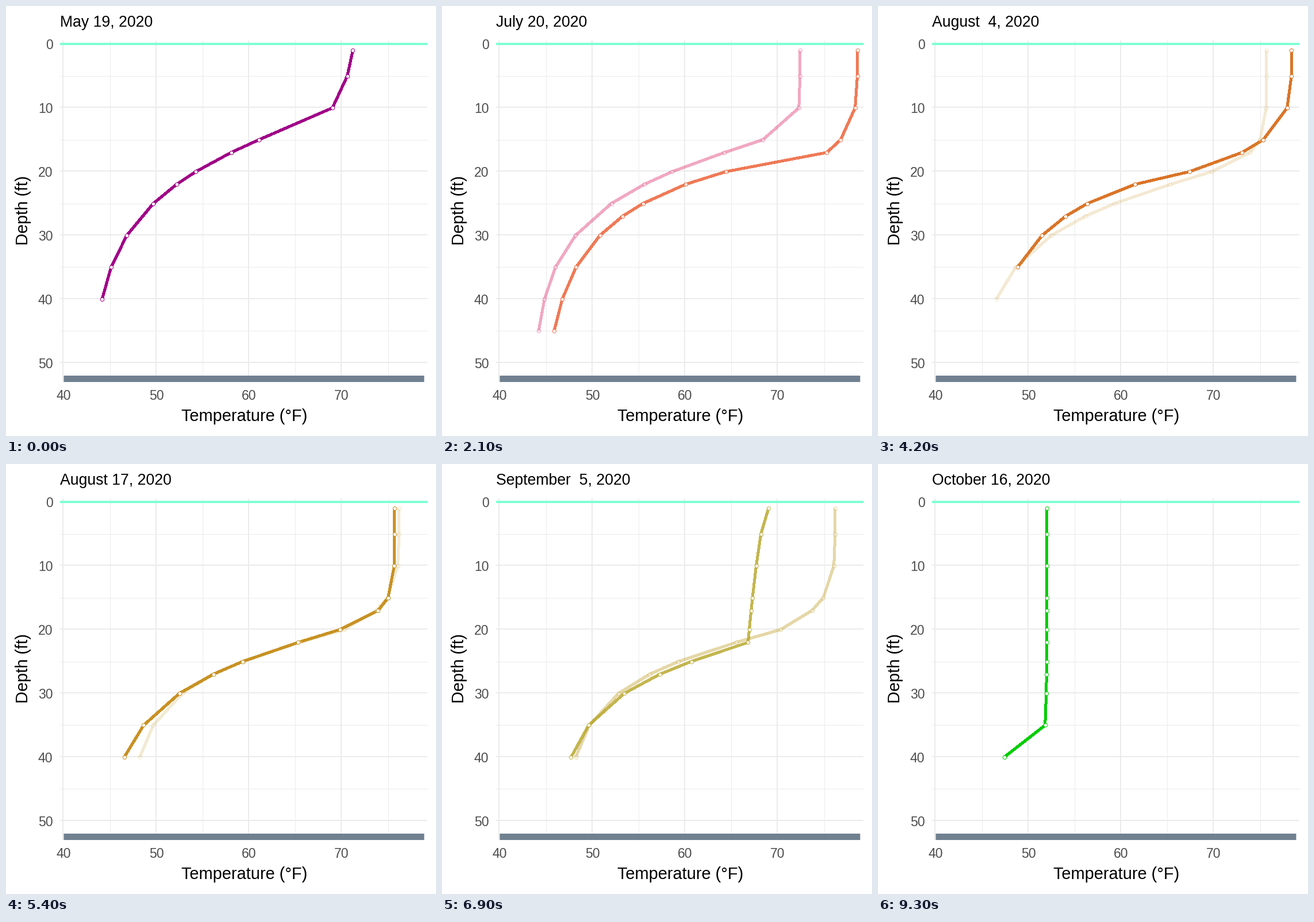
These frames come from a looping animation (748x748 px, 10000 ms). A matplotlib script:

```python
import numpy as np
import matplotlib.pyplot as plt
from matplotlib.animation import FuncAnimation
from matplotlib.colors import LinearSegmentedColormap
from matplotlib.patches import Rectangle

SIZE, DPI = 748, 64
PT = 72 / DPI  # points per pixel
FRAMES, INTERVAL = 100, 100
LEFT, RIGHT, TOP, BOTTOM = 94, 733, 59.5, 653.5

# Each date has a warm layer (surface temperature, bend) down to a knee
# (depth, temperature), a decay below it (floor, scale, shape), and an end depth.
PROFILES = [
    ("May 19, 2020", (71.2, 1.6), (10, 69.0), (43.0, 11.6, 1.2), 40),
    ("June 22, 2020", (72.4, 8), (15, 68.4), (43.5, 9.4, 1.1), 45),
    ("July 20, 2020", (78.6, 4.5), (17, 75.3), (44.5, 7.7, 0.88), 45),
    ("August  4, 2020", (78.4, 4.2), (20, 67.4), (45.0, 7.8, 0.87), 35),
    ("August 17, 2020", (75.7, 7), (20, 69.8), (44.3, 8.9, 1.1), 40),
    ("August 26, 2020", (76.2, 5), (20, 70.3), (47.1, 7.4, 1.12), 40),
    ("September  5, 2020", (69.0, 0.6), (22, 66.8), (46.0, 7.8, 1.1), 40),
    ("October  4, 2020", (56.5, 2), (30, 55.2), (46.0, 5.2, 0.8), 45),
    ("October 16, 2020", (52.0, 6), (35, 51.8), (46.0, 3.5, 1), 40),
]
LAST = len(PROFILES) - 1

PALETTE = LinearSegmentedColormap.from_list("season", [
    (0, "#A00087"), (1 / 8, "#DC2767"), (2 / 8, "#EC592D"),
    (4 / 8, "#C99125"), (6 / 8, "#B8A424"), (1, "#00CD00")])

# every hold and cross-fade takes 12 frames; the last two fades are shorter
FADES = [(6 + 12 * i, 5) for i in range(6)] + [(78, 4), (89, 4)]

plt.rcParams["font.family"] = "Liberation Sans"
fig = plt.figure(figsize=(SIZE / DPI, SIZE / DPI), dpi=DPI, facecolor="white")
ax = fig.add_axes([0, 0, 1, 1])
ax.set_xlim(-0.5, SIZE - 0.5)
ax.set_ylim(SIZE - 0.5, -0.5)
ax.axis("off")


def px(temp):
    return 100 + 16.117 * (temp - 40)


def py(depth):
    return 65.8 + 11.09 * depth


def sample_depths(end, with_27):
    depths = {1, 17, 22, *range(5, end + 1, 5)}
    if with_27:
        depths.add(27)
    return np.array(sorted(depths), dtype=float)


def temperature(depth, warm, knee, decay):
    (surface, bend), (knee_depth, knee_temp) = warm, knee
    floor, scale, shape = decay
    down = np.clip((depth - 1) / (knee_depth - 1), 0, 1)
    below = np.maximum(depth - knee_depth, 0) / scale
    upper = surface + (knee_temp - surface) * down ** bend
    lower = floor + (knee_temp - floor) * np.exp(-below ** shape)
    return np.where(depth <= knee_depth, upper, lower)


def stroke(xs, ys, color, width, z):
    line, = ax.plot(xs, ys, color=color, lw=width * PT, zorder=z,
                    antialiased=False, solid_capstyle="butt",
                    solid_joinstyle="round")
    return line


def label(x, y, text, size, color="black", **kw):
    return ax.text(x, y, text, fontsize=size * PT, color=color, zorder=9,
                   va="baseline", **kw)


def draw_panel():
    for temp in range(40, 80, 5):
        major = temp % 10 == 0
        x = px(temp) - major
        stroke([x, x], [TOP, BOTTOM], "#EBEBEB", 1 + major, 1)
        if major:
            label(px(temp), 685, str(temp), 23, "#4D4D4D", ha="center")
    for depth in range(0, 55, 5):
        major = depth % 10 == 0
        y = py(depth) - major
        stroke([LEFT, RIGHT], [y, y], "#EBEBEB", 1 + major, 1)
        if major:
            label(81, py(depth) + 9, str(depth), 23, "#4D4D4D", ha="right")
    stroke([LEFT, RIGHT], [65.5, 65.5], "#7FFFD4", 4, 2)
    ax.add_patch(Rectangle((px(40), py(52)), px(78.9) - px(40),
                           py(53) - py(52), fc="#708090", lw=0,
                           snap=False, zorder=2))
    label(414.3, 722, "Temperature (°F)", 29, ha="center")
    label(38, 355, "Depth (ft)", 29, ha="center", rotation=90,
          rotation_mode="anchor")


def draw_profile(index):
    _, warm, knee, decay, end = PROFILES[index]
    color = PALETTE(index / LAST)
    depths = sample_depths(end, with_27=index >= 2)
    xs, ys = px(temperature(depths, warm, knee, decay)), py(depths)
    line = stroke(xs, ys, color, 4, 3)
    dots, = ax.plot(xs, ys, "o", ms=6.4 * PT, mfc="white", mec=color,
                    mew=PT, zorder=4, antialiased=False)
    return line, dots


def fade_state(frame):
    """Opacity of every profile and the index of the date shown."""
    alphas = [1.0] + [0.0] * LAST
    shown = 0
    for i, (start, length) in enumerate(FADES):
        step = frame - start + 1
        if step < 1:
            break
        alphas[i] = max(0.0, 1 - (step - 1) / length)
        alphas[i + 1] = min(1.0, step / length)
        if step / length > 0.5:
            shown = i + 1
    return alphas, shown


draw_panel()
title = label(93.6, 35, "", 26.6, ha="left")
profiles = [draw_profile(i) for i in range(len(PROFILES))]


def update(frame):
    alphas, shown = fade_state(frame)
    for artists, alpha in zip(profiles, alphas):
        for artist in artists:
            artist.set_alpha(alpha)
            artist.set_visible(alpha > 0)
    title.set_text(PROFILES[shown][0])
    return [title]


anim = FuncAnimation(fig, update, frames=FRAMES, interval=INTERVAL,
                     repeat=True, repeat_delay=0)
plt.show()
```
